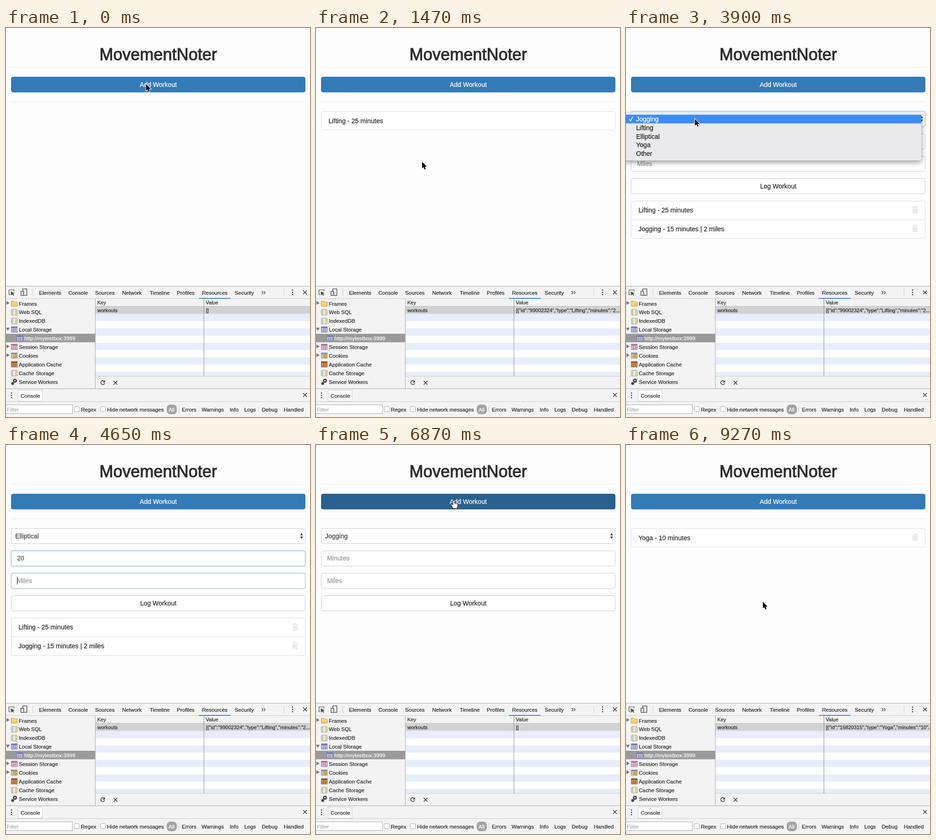
An HTML page that plays this animation: 662 by 846 pixels, repeating every 9300 ms.

```html
<!DOCTYPE html>
<html lang="en">
<head>
<meta charset="utf-8">
<title>Workout log</title>
<style>
  html, body { margin: 0; width: 100%; height: 100%; overflow: hidden; background: #fdfdfd; }
  svg { display: block; font-family: "Liberation Sans", Arial, sans-serif; }
  text { white-space: pre; }
</style>
</head>
<body>
<svg width="662" height="846" viewBox="0 0 662 846">
  <g id="tools"></g>
  <g id="page"></g>
</svg>
<script>
const LOOP = 9300, STEP = 30;
const TYPES = ['Jogging', 'Lifting', 'Elliptical', 'Yoga', 'Other'];

// Drawing helpers; the thin stroke gives text a medium weight
const text = (s, x, y, size = 14, fill = '#2c2c30', more = '', weight = .25) =>
  `<text x="${x}" y="${y}" font-size="${size}" fill="${fill}" stroke="${fill}" stroke-width="${weight}" ${more}>${s}</text>`;
const rect = (x, y, w, h, fill, more = '') =>
  `<rect x="${x}" y="${y}" width="${w}" height="${h}" fill="${fill}" ${more}/>`;
const path = (d, stroke, fill = 'none', more = '') =>
  `<path d="${d}" stroke="${stroke}" fill="${fill}" ${more}/>`;
const at = (x, y, body) => `<g transform="translate(${x} ${y})">${body}</g>`;
const box = (y, h, stroke, fill = '#fefefe', more = '') =>
  rect(11.5, y + .5, 640, h, fill, `rx="4" stroke="${stroke}" ${more}`);
const middle = 'text-anchor="middle"';

// Developer tools panel
const small = (s, x, y, fill) => text(s, x, y, 11.6, fill);
const cross = (x, y) => path(`M${x - 4} ${y - 4}l8 8m0-8l-8 8`, '#444', 'none', 'stroke-width="1.7"');
const dots = (x, y) => [-5, 0, 5].map(d => `<circle cx="${x}" cy="${y + d}" r="1.4" fill="#444"/>`).join('');
const line = (x, y, w, h, fill = '#ccc') => rect(x, y, w, h, fill);
const table = (fill, ink) =>
  rect(.5, .5, 13, 12, fill, `stroke="${ink}"`) + rect(1, 1, 12, 3, ink) + path('M1 7h12M1 10h12M5 1v11M9 1v11', ink);
const cylinder = rect(.5, .5, 4, 13, '#e6dc9c', 'rx="2" stroke="#aaa48a"') +
  rect(9.5, .5, 4, 13, '#ece2a8', 'rx="2" stroke="#aaa48a"') + rect(3.5, .5, 7, 13, '#e6e6e6', 'rx="2" stroke="#a0a0a0"');
const folder = path('M.5 12.5v-11h5l1.5 2h6.5v9Z', '#c69b35', '#f8cd62') + line(1, 5, 12, 1, '#ffe9a8');
const cog = (x, y, r) =>
  `<circle cx="${x}" cy="${y}" r="${r}" fill="none" stroke="#222" stroke-width="1.8"/>` +
  `<circle cx="${x}" cy="${y}" r="${r + 1.4}" fill="none" stroke="#222" stroke-width="1.4" pathLength="16" stroke-dasharray="1"/>`;
const gear = cog(8.5, 4.5, 2.7) + cog(3.5, 10.5, 1.5);

const SIDEBAR = [
  ['Frames', folder, 1], ['Web SQL', cylinder], ['IndexedDB', cylinder],
  ['Local Storage', table('#d8d8f2', '#7878a8'), 2],
  ['http://mytestbox:3999', table('#d8d8f2', '#7878a8')],
  ['Session Storage', table('#f2cfdf', '#a8789a'), 1],
  ['Cookies', table('#e8dca8', '#8a94a0') + '<circle cx="9" cy="8" r="4" fill="#d4a548"/>', 1],
  ['Application Cache', table('#e0a060', '#8f5a30')], ['Cache Storage', cylinder], ['Service Workers', gear]
];

function tools() {
  let o = rect(0, 561, 662, 285, '#f3f3f3') + line(0, 561, 662, 1, '#aaa') + line(0, 588, 662, 1);

  o += path('M10 580H6.5V569.5H17.5V573', '#444', 'none', 'stroke-width="1.2"') +
    path('M10 573l9 4-4 1 3 3-2 1-2.5-3-2 3Z', 'none', '#444') +
    rect(36.5, 567.5, 9, 14, 'none', 'stroke="#444" stroke-width="1.3"') +
    rect(32.5, 572.5, 6, 9, '#f3f3f3', 'stroke="#444" stroke-width="1.3"');
  const tabs = { Elements: 72, Console: 136, Sources: 194, Network: 253, Timeline: 313, Profiles: 372, Resources: 427, Security: 498 };
  for (const name in tabs) o += small(name, tabs[name], 580);
  o += path('M557 572l3 3.5-3 3.5m4.5-7l3 3.5-3 3.5', '#444', 'none', 'stroke-width="1.2"') +
    line(58, 567, 1, 16) + line(605, 567, 1, 16) + line(420, 587, 69, 2, '#4a86e0') + dots(624, 575) + cross(651, 575);

  SIDEBAR.forEach(([name, icon, arrow], i) => {
    const y = 599 + 18.9 * i, chosen = i === 4;
    if (chosen) o += rect(0, 665, 194, 18.5, '#9a9a9a');
    if (arrow) o += path(arrow === 1 ? `M1 ${y - 5}l7 4-7 4Z` : `M0 ${y - 4}h8l-4 7Z`, 'none', '#777');
    o += at(chosen ? 23 : 11, y - 6.5, icon) + small(name, chosen ? 40 : 28, y + 4.5, chosen ? '#fff' : undefined);
  });

  o += rect(195, 605, 467, 152, '#fff');
  for (let k = 1; k < 10; k += 2) o += rect(195, 606 + 15.75 * k, 467, k === 9 ? 9.25 : 15.75, '#e7eefa');
  o += line(194, 589, 1, 195, '#aaa') + line(195, 605, 467, 1, '#bbb') + line(195, 757, 467, 1) +
    text('Key', 199, 601, 11) + text('Value', 435, 601, 11) +
    path('M214.5 769a4.3 4.3 0 1 0 .4 3.5', '#444', 'none', 'stroke-width="1.6"') +
    path('M215.5 766v5h-5Z', 'none', '#444') + cross(238.5, 771.5);

  o += line(0, 784, 662, 1, '#aaa') + dots(12, 799) + rect(26.5, 787.5, 52, 24, '#fff', 'stroke="#ccc"') +
    small('Console', 32, 804) + cross(651, 798) + line(0, 812, 662, 1) +
    rect(-.5, 819.5, 145, 19, '#fff', 'stroke="#aaa"') + small('Filter', 2, 834, '#aaa');
  for (const x of [148.5, 205.5]) o += rect(x, 823.5, 11, 11, '#fff', 'rx="2" stroke="#aaa"');
  o += rect(350, 819, 22, 21, '#a3a3a3', 'rx="8"') + small('All', 354, 834, '#fff') + line(376, 821, 1, 17);
  const filters = { Regex: 163, 'Hide network messages': 220, Errors: 383, Warnings: 426, Info: 487, Logs: 519, Debug: 557, Handled: 605 };
  for (const name in filters) o += small(name, filters[name], 834);
  return o;
}

// Story: each entry patches the state at its time
const lift = { id: '99002324', type: 'Lifting', min: 25, cut: 47 };
const jog = { id: '41873560', type: 'Jogging', min: 15, mi: 2, cut: 47 };
const glide = { id: '70215948', type: 'Elliptical', min: 20, mi: 6, cut: 45 };
const yoga = { id: '15820315', type: 'Yoga', min: 10, cut: 46 };
const open = { form: 1, type: 'Jogging', min: '', mi: '', focus: '' };
const menu = { menu: 1, focus: 'type' };
const pick = type => ({ menu: 0, type });
const log = (...list) => ({ form: 0, focus: '', list });
const STORY = [
  [0, { list: [], focus: '' }],
  [90, open], [360, menu], [630, pick('Lifting')],
  [840, { focus: 'min' }], [960, { min: '2' }], [1080, { min: '25' }],
  [1440, log(lift)], [1530, { trash: 1 }],
  [1800, open], [2130, { focus: 'min' }], [2280, { min: '1' }], [2400, { min: '15' }],
  [2700, { focus: 'mi' }], [2850, { mi: '2' }], [3270, log(lift, jog)],
  [3570, open], [3840, menu], [4080, pick('Elliptical')],
  [4290, { focus: 'min' }], [4410, { min: '2' }], [4500, { min: '20' }],
  [4590, { focus: 'mi' }], [4830, { mi: '6' }], [5130, log(lift, jog, glide)],
  [5580, { row: 1 }],
  [6180, { row: 0, list: [jog, glide] }], [6330, { list: [glide] }], [6480, { list: [] }],
  [6840, open], [7140, menu], [7620, pick('Yoga')],
  [7920, { focus: 'min' }], [8100, { min: '1' }], [8220, { min: '10' }],
  [8670, log(yoga)]
];

// Mouse stops: arrive, leave, x, y
const MOUSE = [
  [0, 90, 305, 122], [300, 480, 150, 200], [570, 660, 120, 216], [810, 1140, 140, 246],
  [1350, 1500, 231, 291], [1740, 1860, 300, 122], [2100, 2460, 200, 246], [2640, 2940, 200, 295],
  [3210, 3330, 270, 331], [3540, 3630, 290, 122], [3810, 3900, 150, 198], [4020, 4110, 130, 235],
  [4260, 4920, 160, 247], [5070, 5190, 260, 340], [5520, 5820, 570, 611], [6120, 6540, 629, 200],
  [6780, 6900, 300, 122], [7110, 7260, 140, 198], [7500, 7680, 151, 246], [7890, 8340, 200, 246],
  [8580, 8730, 300, 295], [9000, LOOP, 298, 341]
];

function mouseAt(t) {
  const i = MOUSE.findLastIndex(m => m[0] <= t), [, leave, x, y] = MOUSE[i];
  if (t <= leave || !MOUSE[i + 1]) return [x, y];
  const [arrive, , nx, ny] = MOUSE[i + 1];
  const u = (t - leave) / (arrive - leave), k = u * u * (3 - 2 * u);
  return [x + (nx - x) * k, y + (ny - y) * k];
}

function stateAt(t) {
  const s = {};
  for (const [time, patch] of STORY) {
    if (time > t) break;
    if ('focus' in patch) { s.was = s.focus; s.since = time; }
    if (patch.min || patch.mi) s.typed = time;
    Object.assign(s, patch);
  }
  return s;
}

// Web page
const slot = i => 181 + 48.7 * i;
const trash = y => at(623, y, path('M.5 2.5h12M4 2V.5h5V2M2 4v10.5h9V4M4.5 5v8m2-8v8m2-8v8', '#d3d3da'));

function cursor(kind, x, y) {
  const shapes = {
    arrow: path('M0 0V14.5L3.3 11.5 5.6 16.7 8 15.7 5.8 10.6H10.3Z', '#fff', '#000', 'stroke-width="2" paint-order="stroke"'),
    hand: path('M-2 8V0a1.6 1.6 0 0 1 3.2 0V5q1.5-1 2.8.3q1.6-.8 2.6.6q2-.4 2.2 1.6V11q-.6 2-1.6 3V16H-1.6Q-2.5 13-6 8.5Q-5.5 6-2 8Z', '#222', '#fff'),
    beam: path('M-3-7q3 0 3 2V5q0 2-3 2M3-7q-3 0-3 2V5q0 2 3 2', '#333')
  };
  return at(x, y, shapes[kind]);
}

function page(t) {
  const s = stateAt(t), [mx, my] = mouseAt(t);
  const over = (y, h = 34) => my >= y && my < y + h;
  const fade = Math.min(1, (t - s.since) / 150);
  const glow = name => s.focus === name ? fade : s.was === name ? 1 - fade : 0;
  let kind = 'arrow';

  const hot = t >= 60 && over(106);
  if (hot) kind = 'hand';
  const blue = hot ? '#286090' : '#337ab7';
  let o = text('MovementNoter', 331.5, 70, 36, '#2e2e2e', middle, 1.1) +
    line(11, 85, 641, 1, '#eeeee2') + line(11, 160, 641, 1, '#e9e9f2') +
    box(106, 33, blue, blue) + text('Add Workout', 331.5, 128, 14, '#fff', middle);

  let top = 181;
  if (s.form) {
    const field = (i, name) => {
      const k = glow(name), y = slot(i);
      return (k ? box(y, 33, '#66afe9', 'none', `stroke-width="5" stroke-opacity="${.3 * k}"`) : '') +
        box(y, 33, '#ccc') + (k ? box(y, 33, '#66afe9', 'none', `stroke-opacity="${k}"`) : '');
    };
    const input = (i, name, hint) => {
      const value = s[name], y = slot(i);
      if (!s.menu && over(y)) kind = 'beam';
      const caret = s.focus === name && (t - s.since) % 1000 < 500;
      return field(i, name) + text(value || hint, 24, y + 21.5, 14, value ? '#555' : '#999') +
        (caret ? line(24 + 7.8 * value.length, y + 9, 1, 16, '#222') : '');
    };
    const far = s.type === 'Jogging' || s.type === 'Elliptical';
    const y = slot(far ? 3 : 2), lit = !s.menu && over(y);
    o += field(0, 'type') + text(s.type, 20, 203, 14, '#444') +
      path('M640.5 196.5h6.5l-3.25-5ZM640.5 199h6.5l-3.25 5Z', 'none', '#444') +
      input(1, 'min', 'Minutes') + (far ? input(2, 'mi', 'Miles') : '') +
      box(y, 33, lit ? '#adadad' : '#ccc', lit ? '#e6e6e6' : '#fefefe') +
      text('Log Workout', 331.5, y + 21.5, 14, undefined, middle);
    if (lit) kind = 'hand';
    top = slot(far ? 4 : 3);
  }

  const n = s.list.length;
  if (n) o += box(top, 40.67 * n, '#ddd');
  s.list.forEach((w, i) => {
    const y = top + 40.67 * i;
    if (i) o += line(12, y, 639, 1, '#ddd');
    o += text(`${w.type} - ${w.min} minutes${w.mi ? ` | ${w.mi} miles` : ''}`, 27, y + 25.5, 14.1);
    if (s.trash) o += trash(y + 12);
    if (mx > 620 && over(y + 10, 20)) kind = 'hand';
  });

  // Stored entry in the tools grid
  const first = s.list[0], ink = s.row ? '#fff' : '#2c2c30';
  const value = first
    ? `[{"id":"${first.id}","type":"${first.type}","minutes":"${first.min}","miles"`.slice(0, first.cut) + '...' : '[]';
  o += rect(195, 606, 467, 15.75, s.row ? '#3874d8' : '#d2d2d2') +
    text('workouts', 199, 618, 11, ink) + text(value, 435.5, 618, 11, ink) + line(430.5, 589, 1, 168, '#888');

  if (s.menu) {
    const pointed = Math.floor((my - 188.6) / 18.85);
    o += rect(-6, 184, 649, 104, '#eaeaec', 'rx="5" style="filter:drop-shadow(0 4px 6px #0006)"');
    TYPES.forEach((name, i) => {
      const y = 188.6 + 18.85 * i, on = i === pointed;
      if (on) o += rect(0, y, 643, 18.85, '#3b8cf3');
      o += text(name, 22, y + 14.3, 14, on ? '#fff' : '#222');
      if (!i) o += path(`M7 ${y + 9.5}l3 4 4.5-9`, on ? '#fff' : '#222', 'none', 'stroke-width="1.6"');
    });
    kind = 'arrow';
  }

  const hidden = s.typed && String(mouseAt(s.typed)) === String([mx, my]);
  return hidden ? o : o + cursor(kind, mx, my);
}

const layer = document.getElementById('page');
document.getElementById('tools').innerHTML = tools();
function draw() {
  const t = performance.now() % LOOP;
  layer.innerHTML = page(Math.floor(t / STEP) * STEP);
  requestAnimationFrame(draw);
}
draw();
</script>
</body>
</html>
```
